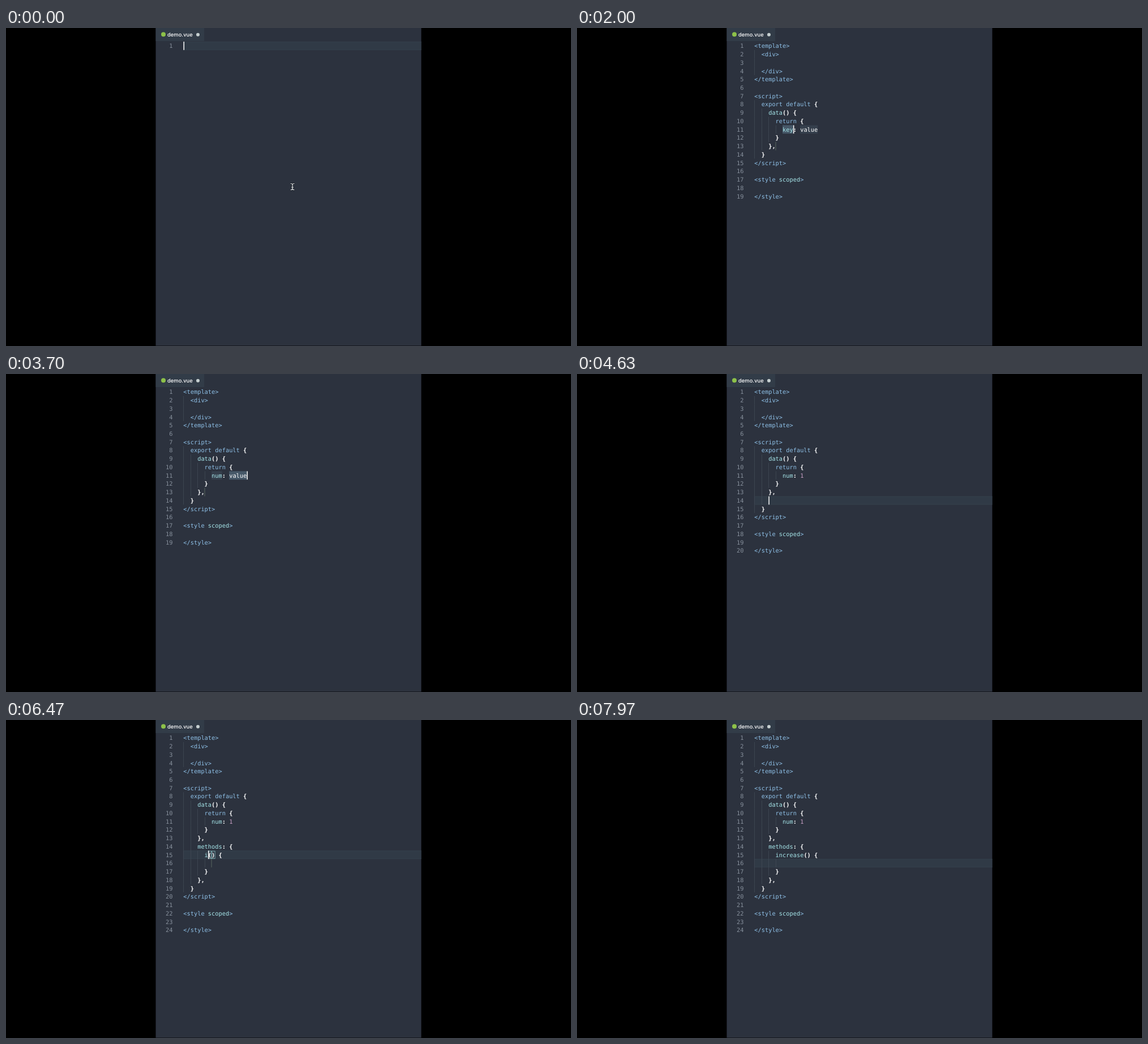
An HTML page with a canvas that plays this animation: 998 by 561 pixels, repeating every 8 s.

```html
<!DOCTYPE html>
<html lang="en">
<head>
<meta charset="utf-8">
<title>Snippet demo</title>
<style>
  html, body { margin: 0; width: 100%; height: 100%; overflow: hidden; background: #000; }
  canvas { display: block; width: 998px; height: 561px; }
</style>
</head>
<body>
<canvas id="stage"></canvas>
<script>
const LOOP = 8000;
const W = 998, H = 561;
const LEFT = 264.5, RIGHT = 733.5;
const TEXT_X = 313.3, CHAR = 6.22, TOP = 24.1, LINE = 14.74, BASE = 11.2;
const MONO = '10.33px "DejaVu Sans Mono", monospace';

const color = {
  panel: '#2c323e', tab: '#323c48', line: '#303a46', lineEdge: '#35414d',
  gutter: '#87909c', guide: '#414a56', marker: '#59665f',
  tag: '#8fc1e8', name: '#a6e6ea', plain: '#ffffff', number: '#c9a0c6',
  selection: '#465868', field: '#353f4c', popup: '#3a4553', detail: '#ccd4dc'
};

const canvas = document.getElementById('stage');
const ctx = canvas.getContext('2d');
const ratio = window.devicePixelRatio || 1;
canvas.width = W * ratio;
canvas.height = H * ratio;

const colX = col => TEXT_X + col * CHAR;
const rowY = row => TOP + (row - 1) * LINE;

// Moments of the key presses
const at = {
  vbase: 400, expand: 1600, num: 2700, toValue: 3400, one: 4000,
  toEnd: 4250, enter: 4550, vmethod: 4900, methods: 5750,
  increase: 6400, toBody: 7400
};

function typed(word, t, start, step) {
  const count = Math.min(word.length, Math.max(0, Math.floor((t - start) / step) + 1));
  return { text: word.slice(0, count), last: count ? start + (count - 1) * step : -1 };
}

function documentLines(field, extra) {
  return [
    '<template>', '  <div>', '  ', '  </div>', '</template>', '',
    '<script>', '  export default {', '    data() {', '      return {',
    '        ' + field, '      }', '    },', ...extra, '  }', '<\/script>', '',
    '<style scoped>', '', '</style>'
  ];
}

function scene(t) {
  if (t < at.expand) {
    const key = typed('vbase', t, at.vbase, 118);
    const n = key.text.length;
    return { lines: [key.text], row: 1, col: n, since: Math.max(0, key.last),
             pointer: n === 0, popup: n > 1 ? n : 0 };
  }
  if (t < at.toValue) {
    const key = typed('num', t, at.num, 150);
    const name = key.text || 'key';
    const end = 8 + name.length;
    return { lines: documentLines(name + ': value', []), row: 11, col: end,
             since: Math.max(at.expand, key.last), selection: key.text ? null : [8, end],
             fields: [[8, end], [end + 2, end + 7]], marker: [13, 6] };
  }
  if (t < at.toEnd) {
    const done = t >= at.one;
    const end = done ? 14 : 18;
    return { lines: documentLines(done ? 'num: 1' : 'num: value', []), row: 11, col: end,
             since: done ? at.one : at.toValue, selection: done ? null : [13, 18],
             fields: [[8, 11], [13, end]], marker: [13, 6] };
  }
  if (t < at.enter)
    return { lines: documentLines('num: 1', []), row: 13, col: 6, since: at.toEnd };
  if (t < at.methods) {
    const key = typed('vmethod', t, at.vmethod, 105);
    return { lines: documentLines('num: 1', ['    ' + key.text]), row: 14,
             col: 4 + key.text.length, since: Math.max(at.enter, key.last) };
  }
  const key = typed('increase', t, at.increase, 120);
  const name = key.text || 'name';
  const end = 6 + name.length;
  const lines = documentLines('num: 1', [
    '    methods: {', '      ' + name + '() {', '        ', '      }', '    },'
  ]);
  if (t >= at.toBody) return { lines, row: 16, col: 8, since: at.toBody };
  return { lines, row: 15, col: end, since: Math.max(at.methods, key.last),
           selection: key.text ? null : [6, end], marker: [16, 8],
           brackets: key.text ? [end, end + 1] : [] };
}

function box(x, y, w, h, fill) {
  ctx.fillStyle = fill;
  ctx.fillRect(x, y, w, h);
}

function dot(x, y, r, fill) {
  ctx.fillStyle = fill;
  ctx.beginPath();
  ctx.arc(x, y, r, 0, Math.PI * 2);
  ctx.fill();
}

function write(text, x, y, fill, font = MONO) {
  ctx.font = font;
  ctx.fillStyle = fill;
  ctx.fillText(text, x, y);
}

function tokenColor(token, rest) {
  if (/^[<>]/.test(token) || /^(export|default|return)$/.test(token)) return color.tag;
  if (/^\d/.test(token)) return color.number;
  if (token === 'scoped' || (/^\w/.test(token) && /^[(:]/.test(rest))) return color.name;
  return color.plain;
}

function drawLine(text, row) {
  const y = rowY(row);
  const indent = text.match(/^ */)[0].length;
  for (let col = 0; col < indent; col += 2)
    box(Math.round(colX(col)), y, 0.8, LINE, color.guide);

  ctx.textAlign = 'right';
  write(row, 294.5, y + BASE, color.gutter);
  ctx.textAlign = 'left';

  for (const match of text.matchAll(/<\/?\w+>?|\w+|[^\s\w]/g)) {
    const token = match[0];
    const rest = text.slice(match.index + token.length);
    const font = /[{}(),:]/.test(token) ? 'bold ' + MONO : MONO;
    write(token, colX(match.index), y + BASE, tokenColor(token, rest), font);
  }
}

function drawPopup(n) {
  const x = colX(n) + 0.5, y = 39.3;
  box(x, y, 316, 14.5, color.popup);
  box(x + 3.5, y + 3.5, 8.5, 8.5, '#20262f');
  ctx.strokeStyle = '#c9d0d6';
  ctx.lineWidth = 1;
  ctx.setLineDash([1.5, 0.7]);
  ctx.strokeRect(x + 4, y + 4, 7.5, 7.5);
  ctx.setLineDash([]);
  write('vbase'.slice(0, n), x + 16.7, y + BASE, color.name, 'bold ' + MONO);
  write('vbase'.slice(n), x + 16.7 + n * CHAR, y + BASE, color.plain);
  write('Base for Vue File (User Snippet)', x + 94.5, y + BASE, color.detail);
  dot(x + 301.2, y + 7.7, 4.6, '#3b88b8');
  box(x + 300.7, y + 5, 1.1, 1.2, '#dfe9f0');
  box(x + 300.7, y + 7, 1.1, 3.4, '#dfe9f0');
}

function drawPointer(x, y) {
  ctx.lineCap = 'round';
  for (const [width, stroke] of [[2.4, '#151a20'], [1.2, '#e6e9ec']]) {
    ctx.strokeStyle = stroke;
    ctx.lineWidth = width;
    ctx.beginPath();
    ctx.moveTo(x - 3, y - 5.5);
    ctx.quadraticCurveTo(x, y - 5.5, x, y - 3.5);
    ctx.quadraticCurveTo(x, y - 5.5, x + 3, y - 5.5);
    ctx.moveTo(x, y - 4);
    ctx.lineTo(x, y + 4);
    ctx.moveTo(x - 3, y + 5.5);
    ctx.quadraticCurveTo(x, y + 5.5, x, y + 3.5);
    ctx.quadraticCurveTo(x, y + 5.5, x + 3, y + 5.5);
    ctx.moveTo(x - 1.5, y + 1);
    ctx.lineTo(x + 1.5, y + 1);
    ctx.stroke();
  }
  ctx.lineCap = 'butt';
}

function drawFrame() {
  box(0, 0, W, H, '#000');
  box(LEFT, 0, RIGHT - LEFT, 560.5, color.panel);
  box(LEFT, 0, 85.5, 23, color.tab);
  dot(278, 11.2, 4, '#8dc149');
  write('demo.vue', 285, 14.9, '#ffffff', '500 9.4px Inter, sans-serif');
  dot(339, 11.7, 3, '#c5cfd0');
}

function draw(t) {
  const s = scene(t);
  const y = rowY(s.row);
  drawFrame();

  if (!s.selection) {
    box(TEXT_X, y, RIGHT - TEXT_X, LINE, color.line);
    box(TEXT_X, y, RIGHT - TEXT_X, 0.8, color.lineEdge);
    box(TEXT_X, y + LINE - 0.8, RIGHT - TEXT_X, 0.8, color.lineEdge);
  }
  const fill = ([from, to], shade) => box(colX(from), y, (to - from) * CHAR, LINE, shade);
  (s.fields || []).forEach(range => fill(range, color.field));
  if (s.selection) fill(s.selection, color.selection);

  s.lines.forEach((text, i) => drawLine(text, i + 1));
  if (s.marker) box(Math.round(colX(s.marker[1])) - 0.5, rowY(s.marker[0]), 1, LINE, color.marker);

  ctx.strokeStyle = '#8cc0c4';
  ctx.lineWidth = 0.8;
  for (const col of s.brackets || [])
    ctx.strokeRect(colX(col) + 0.4, y + 0.8, CHAR - 0.6, LINE - 1.6);

  if (s.popup) drawPopup(s.popup);
  if ((t - s.since) % 1000 < 500) box(colX(s.col) + 0.2, y, 1.5, LINE, '#fff');
  if (s.pointer) drawPointer(506, 280);
}

const start = performance.now();

function tick() {
  ctx.setTransform(ratio, 0, 0, ratio, 0, 0);
  ctx.textRendering = 'geometricPrecision';
  draw((performance.now() - start) % LOOP);
  requestAnimationFrame(tick);
}
tick();
</script>
</body>
</html>
```
